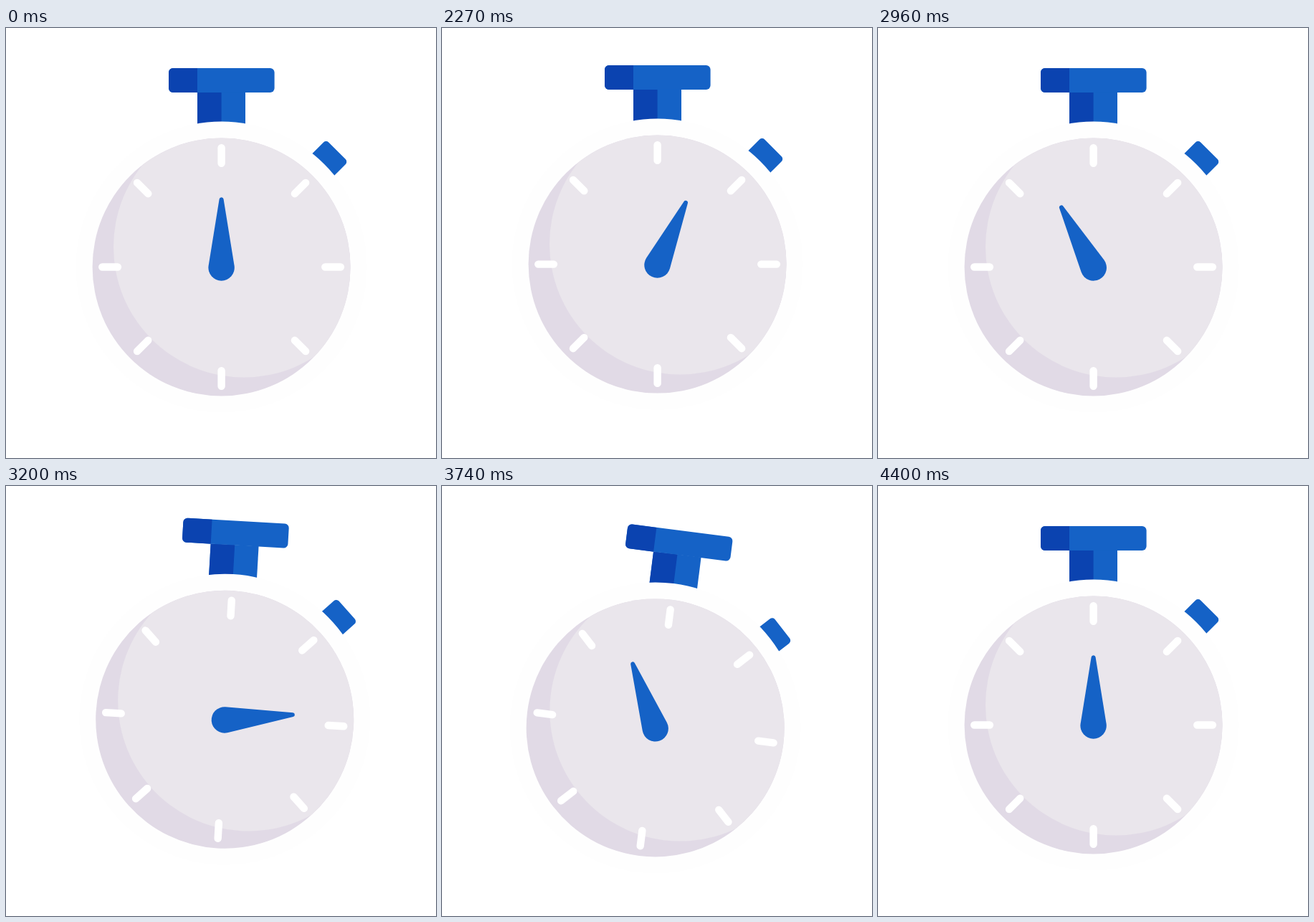
Write an HTML page that moves like this. It is 600 by 600 pixels and loops after 4.43 s.

```html
<!DOCTYPE html>
<html lang="en">
<head>
<meta charset="utf-8">
<title>Stopwatch</title>
<style>
  html, body { margin: 0; width: 100%; height: 100%; overflow: hidden; background: #fff; }
  svg { display: block; width: 100%; height: 100%; }
</style>
</head>
<body>
<svg viewBox="0 0 600 600">
  <clipPath id="dial"><circle r="180"/></clipPath>
  <g id="watch">
    <g fill="#1562c6">
      <rect x="-73.6" y="-277.5" width="147.6" height="34" rx="6"/>
      <rect x="-33.6" y="-244" width="67" height="60"/>
      <g transform="rotate(45)"><rect id="button" x="-22.3" y="-228.8" width="43.4" height="50" rx="5"/></g>
    </g>
    <path fill="#0b43b0" d="M-33.6-277.5V-243.5H-67.6a6 6 0 0 1-6-6V-271.5a6 6 0 0 1 6-6ZM-33.6-243.5H0V-184H-33.6Z"/>
    <circle r="203" fill="#fefefe"/>
    <circle r="180" fill="#e1dae6"/>
    <circle cx="31.4" cy="-28" r="182" fill="#eae6ec" clip-path="url(#dial)"/>
    <g id="ticks" stroke="#fff" stroke-width="10.4" stroke-linecap="round"></g>
    <g transform="translate(0 .7)">
      <path id="hand" fill="#1562c6" d="M-2.96-95.5A3 3 0 0 1 2.96-95.5L18-2.4A18.2 18.2 0 1 1-18-2.4Z"/>
    </g>
  </g>
</svg>
<script>
const LOOP = 4430, START = 2000, STEP = 30;
const $ = id => document.getElementById(id);
const move = (id, transform) => $(id).setAttribute('transform', transform);

$('ticks').innerHTML = Array.from({ length: 8 }, (_, i) =>
  `<path d="M0-166.3V-144.7" transform="rotate(${i * 45})"/>`).join('');

const ramp = (t, from, to) => Math.min(1, Math.max(0, (t - from) / (to - from)));
const ease = (t, from, to) => {
  const p = ramp(t, from, to);
  return p * p * (3 - 2 * p);
};
// Rises from 0 to 1 at the peak and falls back to 0.
const pulse = (t, from, peak, to) => ease(t, from, peak) - ease(t, peak, to);

function draw(ms) {
  const t = START + Math.max(0, Math.floor((ms % LOOP - START) / STEP)) * STEP;

  const dip = pulse(t, 2000, 2120, 2345);
  const hop = pulse(t, 2120, 2345, 2570);
  const rise = ease(t, 3075, 3450);
  const leap = rise - ease(t, 3560, 3790);
  const landing = pulse(t, 3560, 3790, 4090);
  const rebound = pulse(t, 3790, 4090, 4400);

  const x = 300.6 + 17.8 * leap - 5.8 * landing;
  const y = 333.5 + 13.5 * dip - 10 * hop - 30 * leap + 8.6 * landing - 4 * rebound;
  const tilt = 6.2 * leap + 6.5 * (rise - ease(t, 3790, 4350));
  const press = 16 * (pulse(t, 2000, 2110, 2230) + pulse(t, 3705, 3810, 3930));
  const turns = ramp(t, 2215, 3023) + ramp(t, 3023, 3797);

  move('watch', `translate(${x} ${y}) rotate(${tilt})`);
  move('button', `translate(0 ${press})`);
  move('hand', `rotate(${360 * turns})`);
}

const begin = performance.now();
function tick() {
  draw(performance.now() - begin);
  requestAnimationFrame(tick);
}
tick();
</script>
</body>
</html>
```
